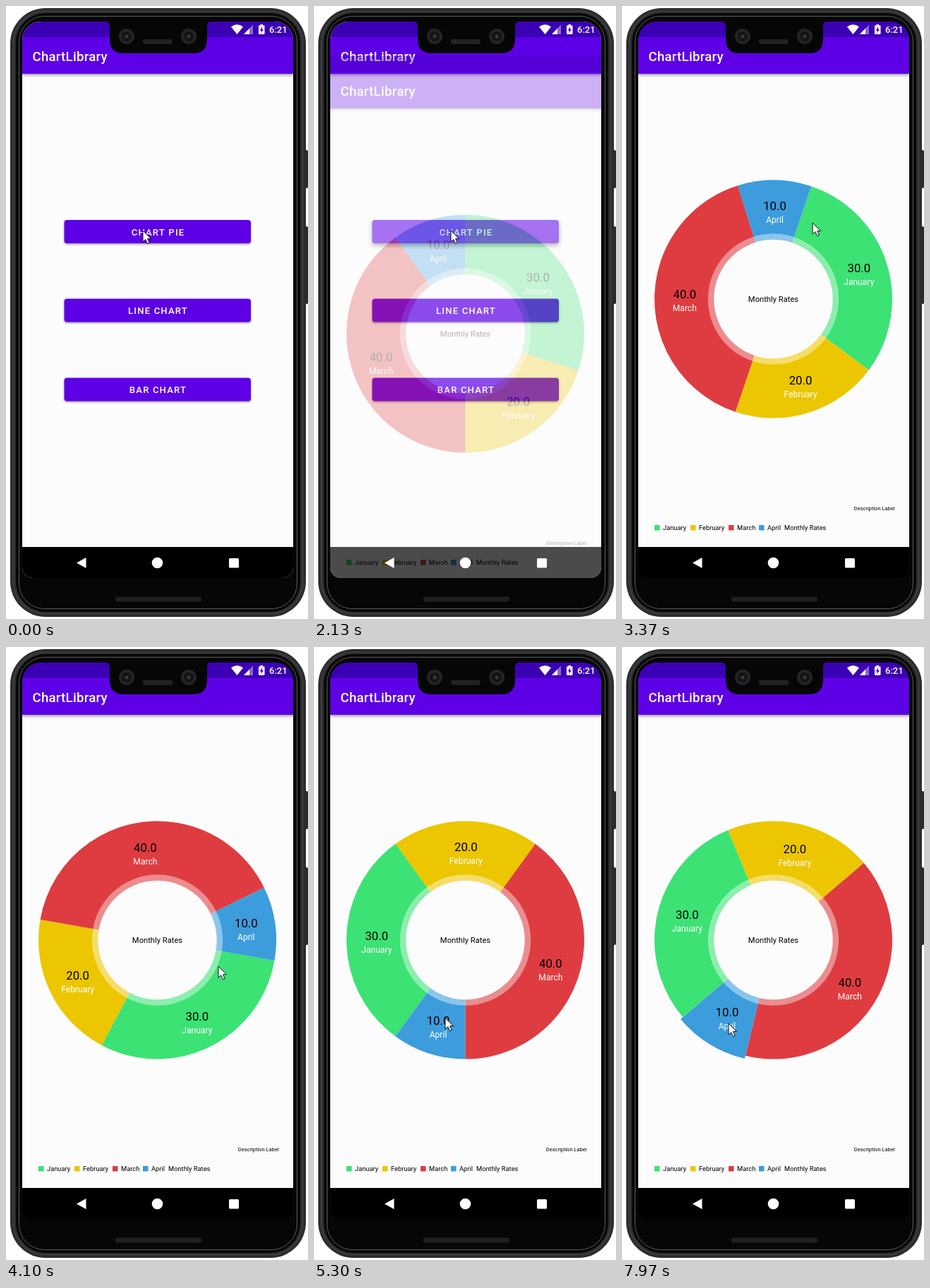
These frames come from a looping animation (428 px wide and 868 px high, 8 s). An HTML page with a canvas:

```html
<!DOCTYPE html>
<html lang="en">
<head>
<meta charset="utf-8">
<title>ChartLibrary</title>
<style>
  html, body { margin: 0; height: 100%; overflow: hidden; background: #fff; }
  canvas { display: block; }
</style>
</head>
<body>
<canvas id="stage" width="428" height="868"></canvas>
<script>
const LOOP = 8000, TAU = Math.PI * 2;
const PAPER = '#fcfcfd', PURPLE = '#5e00e6', INDIGO = '#3c00b4';
const CX = 214.5, CY = 415, RADIUS = 168.5;
const SLICES = [
  { name: 'January', value: 30, color: '#3ce274', legendX: 46 },
  { name: 'February', value: 20, color: '#ecc600', legendX: 97 },
  { name: 'March', value: 40, color: '#de3c40', legendX: 151 },
  { name: 'April', value: 10, color: '#3c9cdc', legendX: 194 },
];
const BUTTONS = [['CHART PIE', 303], ['LINE CHART', 414.5], ['BAR CHART', 526.5]];

// [time, ...values]
const ROTATION = [[3100, 0], [3370, 18.5], [4100, 99.8], [5150, 190], [5300, 216], [5700, 229.6]];
const POINTER = [
  [2800, 194, 318], [3080, 232, 301], [3370, 270, 307], [3760, 313, 378], [4100, 301, 452],
  [4650, 260, 513], [5180, 186, 525], [5800, 186, 525], [6100, 148, 638], [6500, 106, 811],
  [6700, 104, 796], [7300, 104, 796], [7700, 160, 560], [7970, 151, 533],
];
const HIGHLIGHT_AT = 5750, OPEN_AT = 2130;

const screenCtx = document.getElementById('stage').getContext('2d');
const chartLayer = document.createElement('canvas');
chartLayer.width = 428;
chartLayer.height = 868;
const chartCtx = chartLayer.getContext('2d');

const clamp = v => Math.min(1, Math.max(0, v));
const progress = (t, from, to) => clamp((t - from) / (to - from));

// Monotone cubic interpolation through the keys
function track(keys, t, k = 1) {
  const last = keys.length - 1;
  if (t <= keys[0][0]) return keys[0][k];
  if (t >= keys[last][0]) return keys[last][k];
  const slope = i => (keys[i + 1][k] - keys[i][k]) / (keys[i + 1][0] - keys[i][0]);
  const tangent = i => {
    if (i === 0 || i === last) return 0;
    const a = slope(i - 1), b = slope(i);
    return a * b > 0 ? 2 * a * b / (a + b) : 0;
  };
  const i = keys.findIndex(key => key[0] > t) - 1;
  const [p, q] = [keys[i], keys[i + 1]];
  const h = q[0] - p[0], u = (t - p[0]) / h, v = 1 - u;
  return v * v * (1 + 2 * u) * p[k] + u * u * (3 - 2 * u) * q[k]
    + h * u * v * (v * tangent(i) - u * tangent(i + 1));
}

function box(c, x, y, w, h, r, fill, stroke, line = 1) {
  c.beginPath();
  c.roundRect(x, y, w, h, r);
  if (fill) { c.fillStyle = fill; c.fill(); }
  if (stroke) { c.strokeStyle = stroke; c.lineWidth = line; c.stroke(); }
}

function disc(c, x, y, r, fill) {
  c.beginPath();
  c.arc(x, y, r, 0, TAU);
  c.fillStyle = fill;
  c.fill();
}

function shape(c, points, fill, stroke) {
  c.beginPath();
  points.forEach(([x, y]) => c.lineTo(x, y));
  c.closePath();
  c.fillStyle = fill;
  c.fill();
  if (stroke) { c.strokeStyle = stroke; c.lineWidth = 1; c.stroke(); }
}

function label(c, text, x, y, size, color, align = 'left', weight = 400, spacing = 0) {
  c.font = `${weight} ${size}px Roboto, sans-serif`;
  c.letterSpacing = `${spacing}px`;
  c.textAlign = align;
  c.fillStyle = color;
  c.fillText(text, x, y);
}

function withShadow(c, blur, dy, draw) {
  c.save();
  c.shadowColor = 'rgba(0,0,0,.4)';
  c.shadowBlur = blur;
  c.shadowOffsetY = dy;
  draw();
  c.restore();
}

function drawPage(c) {
  box(c, 23, 22, 384, 788, 0, PAPER);
  withShadow(c, 4, 2, () => box(c, 23, 44, 384, 52, 0, PURPLE));
  box(c, 23, 22, 384, 22, 0, INDIGO);
  box(c, 23, 766, 384, 44, 0, '#000');
  label(c, 'ChartLibrary', 37.5, 77.5, 18.68, '#fff', 'left', 500, 0.23);
}

function drawButton(c, [text, y], glow = 0, lift = 0) {
  withShadow(c, 3 + 3 * lift, 1.5 + 1.5 * lift, () => box(c, 82.5, y, 264.5, 33, 4, PURPLE));
  if (glow) box(c, 82.5, y, 264.5, 33, 4, `rgba(255,255,255,${glow})`);
  label(c, text, 215.5, y + 21.7, 13.07, '#fff', 'center', 500, 1.17);
}

function drawMenu(c, t) {
  drawPage(c);
  const press = progress(t, 1630, 1730);
  const touch = t >= 1030 && t < 1300 ? 0.06 : 0;
  BUTTONS.forEach((b, i) => i ? drawButton(c, b) : drawButton(c, b, touch + 0.22 * press, press));
}

function drawChart(c, t) {
  drawPage(c);
  let start = track(ROTATION, t);
  const tags = [];
  for (const { name, value, color, legendX } of SLICES) {
    const sweep = value * 3.6;
    const toRad = deg => (deg - 90) * TAU / 360;
    const grown = name === 'April' && t >= HIGHLIGHT_AT ? 4.2 : 0;
    c.beginPath();
    c.moveTo(CX, CY);
    c.arc(CX, CY, RADIUS + grown, toRad(start), toRad(start + sweep));
    c.fillStyle = color;
    c.fill();
    const mid = toRad(start + sweep / 2);
    tags.push([name, value.toFixed(1), CX + 126.4 * Math.cos(mid), CY + 126.4 * Math.sin(mid)]);
    box(c, legendX, 735, 7.5, 7.5, 0, color);
    label(c, name, legendX + 12, 742, 9.34, '#000');
    start += sweep;
  }
  disc(c, CX, CY, RADIUS * 0.55, 'rgba(255,255,255,.41)');
  disc(c, CX, CY, RADIUS * 0.5, PAPER);
  for (const [name, value, x, y] of tags) {
    label(c, value, x + 0.7, y, 16.8, '#000', 'center');
    label(c, name, x + 0.7, y + 18, 12.1, '#fff', 'center');
  }
  label(c, 'Monthly Rates', CX, 419, 11.2, '#000', 'center');
  label(c, 'Monthly Rates', 230, 742, 9.34, '#000');
  label(c, 'Description Label', 386.5, 713.5, 7.47, '#000', 'right');
}

function drawBody(c) {
  box(c, 423, 204, 5, 54, 2, '#2a2a2c');
  box(c, 423, 312, 5, 110, 2, '#2a2a2c');
  box(c, 6, 3, 419, 862, 50, '#2c2c2e');
  box(c, 10.5, 7.5, 410, 853, 45, null, '#3c3c3e', 2);
  box(c, 14, 10, 403, 848, 42, '#080808');
  box(c, 18.5, 14.5, 394, 839, 36, null, '#5c5c5e');
  box(c, 20, 16, 391, 836, 34, '#060606');
  box(c, 155, 836.5, 122, 7, 3, '#202020');
}

function drawNotch(c) {
  c.beginPath();
  c.moveTo(141, 21);
  c.quadraticCurveTo(147, 22, 147, 29);
  c.lineTo(147, 47);
  c.quadraticCurveTo(147, 67, 167, 67);
  c.lineTo(265, 67);
  c.quadraticCurveTo(285, 67, 285, 47);
  c.lineTo(285, 29);
  c.quadraticCurveTo(285, 22, 291, 21);
  c.fillStyle = '#060606';
  c.fill();
  for (const x of [171, 259]) {
    disc(c, x, 43, 11, '#242426');
    disc(c, x, 43, 7, '#141416');
    disc(c, x, 43, 2.5, '#3a3a3e');
  }
  box(c, 194, 47, 42, 7, 3, '#222');
}

function drawStatus(c) {
  c.beginPath();
  c.moveTo(327.5, 40);
  c.lineTo(319, 29.5);
  c.quadraticCurveTo(327.5, 23, 336, 29.5);
  c.fillStyle = '#fff';
  c.fill();
  shape(c, [[337, 40], [350, 40], [350, 26.5]], 'rgba(255,255,255,.4)');
  shape(c, [[337, 40], [345, 40], [345, 31.7]], '#fff');
  box(c, 358, 27.5, 8.5, 12.5, 1, '#fff');
  box(c, 360.5, 26, 3.5, 2, 0, '#fff');
  shape(c, [[363, 29], [359.8, 34.5], [361.8, 34.5], [361.5, 38.5], [364.8, 33], [362.8, 33]], INDIGO);
  label(c, '6:21', 373, 38, 13, '#fff', 'left', 500);
}

function drawNavigation(c, t) {
  const grow = progress(t, 6970, 7070), fade = progress(t, 7300, 7500);
  if (grow > 0 && fade < 1) {
    c.save();
    c.beginPath();
    c.rect(23, 766, 384, 44);
    c.clip();
    disc(c, 107, 788, 20 + 25 * grow + 13 * fade, `rgba(255,255,255,${0.16 * grow * (1 - fade)})`);
    c.restore();
  }
  shape(c, [[100, 788.5], [113.5, 781], [113.5, 796]], '#fff');
  disc(c, 214.5, 788.5, 7.8, '#fff');
  box(c, 316, 782, 14, 13.5, 1.5, '#fff');
}

function drawPointer(c, t) {
  c.save();
  c.translate(track(POINTER, t, 1), track(POINTER, t, 2));
  shape(c, [[0, 0], [0, 16], [3.8, 12.6], [6.6, 18.6], [9.2, 17.5], [6.6, 11.6], [11.5, 11.5]], '#fff', '#111');
  c.restore();
}

function render(t) {
  const c = screenCtx;
  box(c, 0, 0, 428, 868, 0, '#fff');
  drawBody(c);

  c.save();
  c.beginPath();
  c.roundRect(23, 22, 384, 788, [26, 26, 15, 15]);
  c.clip();
  const age = t - OPEN_AT + 16;
  if (age < 350) drawMenu(c, t);
  if (t >= OPEN_AT) {
    // New page fades in while it slides up
    drawChart(chartCtx, t);
    c.globalAlpha = 1 - (1 - clamp(age / 200)) ** 4;
    c.drawImage(chartLayer, 0, 63 * (1 - clamp(age / 350)) ** 5);
    c.globalAlpha = 1;
  }
  drawNavigation(c, t);
  c.restore();

  drawNotch(c);
  drawStatus(c);
  drawPointer(c, t);
}

const began = performance.now();
(function tick() {
  render((performance.now() - began) % LOOP);
  requestAnimationFrame(tick);
})();
</script>
</body>
</html>
```
